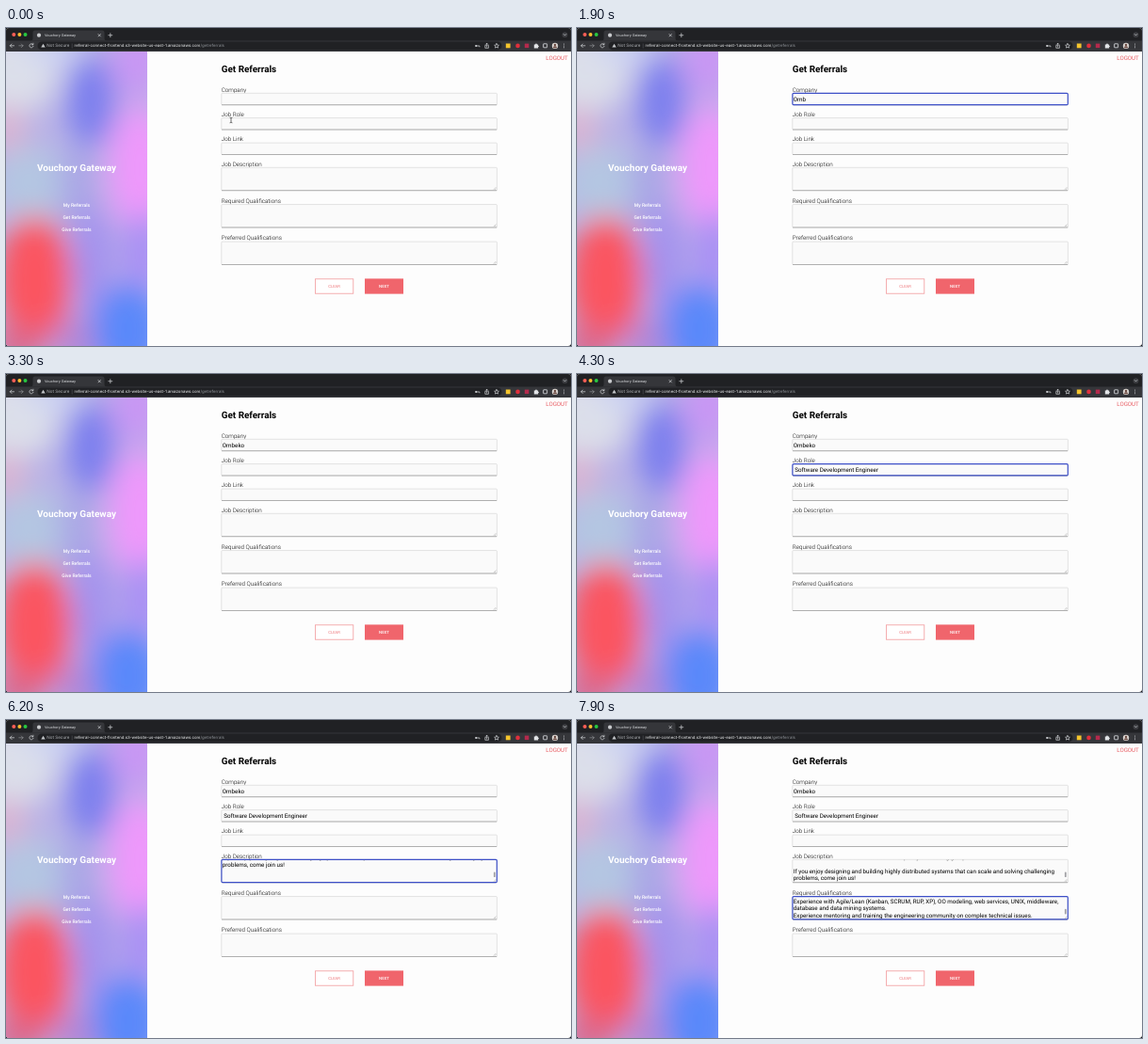
Animation of 600 by 338 pixels, one loop 8 s. Source, as an HTML page:

```html
<!DOCTYPE html>
<html lang="en">
<head>
<meta charset="utf-8">
<title>Get Referrals</title>
<style>
  html, body { margin: 0; width: 100%; height: 100%; overflow: hidden; background: #000; }
  svg { display: block; width: 100vw; height: 100vh; }
  text { font-family: Roboto, Arial, sans-serif; text-rendering: geometricPrecision; white-space: pre; }
  .chrome text { font-family: Inter, Roboto, sans-serif; }
  .icon { fill: none; stroke: #d5d7da; stroke-width: .7; stroke-linecap: round; stroke-linejoin: round; }
</style>
</head>
<body>
<svg id="stage" viewBox="0 0 600 338" preserveAspectRatio="none">
  <defs>
    <filter id="soft" x="-60%" y="-60%" width="220%" height="220%"><feGaussianBlur stdDeviation="15"/></filter>
    <clipPath id="window"><rect width="600" height="338" rx="3"/></clipPath>
    <clipPath id="side"><rect y="25" width="150" height="313"/></clipPath>
  </defs>
  <g clip-path="url(#window)">
    <rect width="600" height="338" fill="#fdfdfd"/>
    <g id="sidebar" clip-path="url(#side)"></g>
    <g id="chrome" class="chrome"></g>
    <g id="page"></g>
    <g id="fields"></g>
    <g id="pointer" fill="none" stroke="#333" stroke-width=".7">
      <path d="M-1.4-2.8Q0-2.8 0-1.8Q0-2.8 1.4-2.8M0-1.8V1.8M-1.4 2.8Q0 2.8 0 1.8Q0 2.8 1.4 2.8"/>
    </g>
  </g>
</svg>
<script>
const LOOP = 8000;
const APP = 'Vouchory Gateway';
const COMPANY = 'Ombeko';
const SVG_NS = 'http://www.w3.org/2000/svg';
const byId = id => document.getElementById(id);

function add(parent, tag, attrs, content) {
  const node = document.createElementNS(SVG_NS, tag);
  for (const key in attrs) node.setAttribute(key, attrs[key]);
  if (content !== undefined) node.textContent = content;
  return parent.appendChild(node);
}
const label = (parent, x, y, size, content, attrs = {}) =>
  add(parent, 'text', { x, y, 'font-size': size, ...attrs }, content);
const show = (node, on) => node.setAttribute('visibility', on ? 'visible' : 'hidden');

function drawSidebar() {
  const side = byId('sidebar');
  add(side, 'rect', { y: 25, width: 150, height: 313, fill: '#b9b2e6' });
  const blur = add(side, 'g', { filter: 'url(#soft)' });
  // cx, cy, rx, ry, colour
  [
    [10, 45, 48, 45, '#dcdfea'],
    [52, 20, 30, 20, '#ccd3f3'],
    [140, 35, 28, 40, '#c996f4'],
    [90, 78, 26, 48, '#7c7fee'],
    [2, 108, 18, 26, '#dfb4cf'],
    [142, 150, 34, 68, '#ee98fb'],
    [25, 165, 40, 40, '#b4c6e2'],
    [76, 170, 18, 50, '#a9a4e6'],
    [92, 248, 22, 60, '#a391ee'],
    [145, 240, 20, 44, '#a88df6'],
    [30, 268, 40, 68, '#fb5560'],
    [12, 338, 30, 22, '#d9698f'],
    [75, 335, 24, 30, '#b487d6'],
    [130, 322, 38, 50, '#5a88fa']
  ].forEach(([cx, cy, rx, ry, fill]) => add(blur, 'ellipse', { cx, cy, rx, ry, fill }));

  const centred = { 'text-anchor': 'middle', fill: '#fff' };
  label(side, 75, 151.5, 10, APP, { ...centred, 'font-weight': 700 });
  ['My Referrals', 'Get Referrals', 'Give Referrals'].forEach((item, i) =>
    label(side, 75, 189.7 + i * 13, 5, item, { ...centred, 'font-weight': 500 }));
}

function drawChrome() {
  const bar = byId('chrome');
  const icon = d => add(bar, 'path', { d, class: 'icon' });
  const dot = (cx, cy, r, fill) => add(bar, 'circle', { cx, cy, r, fill });

  add(bar, 'rect', { width: 600, height: 25, fill: '#202124' });
  add(bar, 'rect', { y: 13.5, width: 600, height: 11.5, fill: '#35363a' });
  add(bar, 'path', { d: 'M26 13.5Q28.5 13.5 28.5 11V5Q28.5 2.5 31 2.5H102Q104.5 2.5 104.5 5V11Q104.5 13.5 107 13.5Z', fill: '#35363a' });
  ['#fe5f57', '#febc2e', '#28c840'].forEach((fill, i) => dot(8.3 + i * 6.1, 7, 2, fill));
  dot(35, 7.7, 2.1, '#c9cbce');
  label(bar, 41, 9.3, 3.7, APP, { fill: '#e8eaed' });
  icon('M98 6.5l2.4 2.4M100.4 6.5l-2.4 2.4M108.8 7.7h4M110.8 5.7v4');
  dot(593.5, 7.2, 2.9, '#3c3d41');
  icon('M592.2 6.6l1.3 1.3l1.3-1.3');

  icon('M8.6 18.8H4.3M6.1 17l-1.8 1.8l1.8 1.8');
  icon('M13.8 18.8H18M16.3 17l1.8 1.8l-1.8 1.8').setAttribute('opacity', .55);
  icon('M28.8 17.7A2.1 2.1 0 1 0 29 19.4M28.9 16.2v1.6h-1.6');

  add(bar, 'rect', { x: 33.5, y: 14.4, width: 493, height: 9, rx: 4.5, fill: '#202124' });
  add(bar, 'path', { d: 'M39.5 16.7l2.2 3.9h-4.4Z', fill: '#c4c7ca' });
  label(bar, 43.3, 20.4, 4.55, 'Not Secure', { fill: '#b5b8bc' });
  add(bar, 'path', { d: 'M70.2 16.5v5', stroke: '#5f6368', 'stroke-width': .5 });
  const url = label(bar, 72.6, 20.4, 4.33, '');
  add(url, 'tspan', { fill: '#f1f3f4' }, 'referral-connect-frontend.s3-website-us-east-1.amazonaws.com');
  add(url, 'tspan', { fill: '#8f9398' }, '/getreferrals');

  dot(499.2, 19, 1.1, '#d5d7da');
  icon('M500.4 19h2.5v.9');
  icon('M509.4 18.4h-.6v2.9h3.6v-2.9h-.6M510.6 20v-3.6M509.5 17.3l1.1-1.1l1.1 1.1');
  icon('M521 16.6l.7 1.5l1.7.2l-1.2 1.1l.3 1.7l-1.5-.8l-1.5.8l.3-1.7l-1.2-1.1l1.7-.2Z');
  add(bar, 'rect', { x: 530.8, y: 16.5, width: 4.8, height: 4.8, fill: '#f6c52c' });
  dot(543.5, 18.9, 2.3, '#e02f3c');
  add(bar, 'rect', { x: 550.8, y: 16.6, width: 4.5, height: 4.5, fill: '#b42a4c' });
  add(bar, 'path', { d: 'M560.8 17.4h1.3a.9.9 0 0 1 1.8 0h1.2v1.3a.8.8 0 0 1 0 1.6v1.2h-4.3Z', fill: '#e1e3e6' });
  add(bar, 'rect', { x: 570.6, y: 16.8, width: 4, height: 4, rx: .4, fill: 'none', stroke: '#e1e3e6', 'stroke-width': .8 });
  dot(583, 18.9, 3.2, '#d8d2ce');
  dot(583, 18, 1.2, '#6a4a42');
  add(bar, 'path', { d: 'M580.9 21.3a2.1 2.1 0 0 1 4.2 0Z', fill: '#6a4a42' });
  [17.1, 18.9, 20.7].forEach(y => dot(592.5, y, .5, '#d5d7da'));
}

function drawPage() {
  const page = byId('page');
  label(page, 228.8, 46.9, 9.9, 'Get Referrals', { 'font-weight': 700, fill: '#000' });
  label(page, 596.7, 33.7, 6.15, 'LOGOUT', { 'text-anchor': 'end', fill: '#e85d63' });
  add(page, 'rect', { x: 328.4, y: 266.8, width: 40.4, height: 15.4, fill: '#fff', stroke: '#f29a9d', 'stroke-width': .8 });
  add(page, 'rect', { x: 381, y: 266.4, width: 41, height: 16.2, fill: '#f0656c' });
  label(page, 348.6, 276, 4.2, 'CLEAR', { 'text-anchor': 'middle', fill: '#ee767b' });
  label(page, 401.5, 276, 4.3, 'NEXT', { 'text-anchor': 'middle', fill: '#fff', 'font-weight': 500 });
}

function makeField(name, top, height) {
  const root = add(byId('fields'), 'g', {});
  const area = height > 20;
  label(root, 228.8, top - 1.5, 6.25, name, { 'font-weight': 300, fill: '#000' });
  add(root, 'rect', { x: 228.8, y: top + .3, width: 292.6, height: height - .6, rx: .8, fill: '#fafafa', stroke: '#d0d0d0', 'stroke-width': .6 });
  add(root, 'path', { d: `M229 ${top + height - .3}H521.2`, stroke: '#a3a3a3', 'stroke-width': .8 });

  const clipId = 'clip' + top;
  const clip = add(root, 'clipPath', { id: clipId });
  add(clip, 'rect', { x: 229, y: top + .7, width: 292, height: height - 1.4 });
  const content = add(root, 'g', { 'clip-path': `url(#${clipId})` });
  const text = add(content, 'g', {});
  const thumb = add(root, 'rect', { x: 517.9, y: top + 13.5, width: 1.8, height: 5.6, rx: .9, fill: '#a2a2a6', visibility: 'hidden' });
  if (area) {
    const corner = top + height - 1.2;
    add(root, 'path', { d: `M517.8 ${corner}l2.6-2.6M519.2 ${corner}l1.2-1.2`, stroke: '#888', 'stroke-width': .4 });
  }
  const ring = add(root, 'rect', { x: 228.9, y: top + .4, width: 292.4, height: height - .8, rx: 1.2, fill: 'none', stroke: '#3e50c8', 'stroke-width': 1.2 });
  return { text, ring, thumb };
}

const LINE = 7.5;
const writeLines = (field, x, y, lines) => lines.map((line, i) =>
  label(field.text, x, y + i * LINE, 6.25, line, { fill: '#000' }));

drawSidebar();
drawChrome();
drawPage();

const company = makeField('Company', 69, 13);
const role = makeField('Job Role', 95.3, 13);
const link = makeField('Job Link', 121.8, 13);
const description = makeField('Job Description', 148, 25);
const required = makeField('Required Qualifications', 187.3, 25);
const preferred = makeField('Preferred Qualifications', 226.8, 25);

const [companyText] = writeLines(company, 229.8, 77.8, ['']);
writeLines(role, 231.2, 104, ['Software Development Engineer']);
writeLines(description, 229.8, 147.6, [
  'The ideal candidate has an interest in the quality of a strong group.',
  '',
  'If you enjoy designing and building highly distributed systems that can scale and solving challenging',
  'problems, come join us!'
]);
writeLines(required, 229.8, 194.8, [
  'Experience with Agile/Lean (Kanban, SCRUM, RUP, XP), OO modeling, web services, UNIX, middleware,',
  'database and data mining systems.',
  'Experience mentoring and training the engineering community on complex technical issues.'
]);

const KEY_TIMES = [1500, 1700, 1850, 2050, 2200, 2400];
// [field, focus, blur, filled]
const VISITS = [
  [company, 750, 2800, 0],
  [role, 3800, 4700, 4100],
  [link, LOOP, LOOP, LOOP],
  [description, 5400, 6800, 5800],
  [required, 7100, LOOP, 7500],
  [preferred, LOOP, LOOP, LOOP]
];
const AREAS = [description, required];

function render(t) {
  for (const [field, focus, blur, filled] of VISITS) {
    show(field.ring, t >= focus && t < blur);
    show(field.text, t >= filled);
    if (AREAS.includes(field)) show(field.thumb, t >= filled);
  }
  companyText.textContent = COMPANY.slice(0, KEY_TIMES.filter(k => t >= k).length);
  description.text.setAttribute('transform', `translate(0 ${t < 6500 ? -14.4 : 0})`);

  const p = Math.min(1, Math.max(0, (t - 250) / 450));
  const ease = p * p * (3 - 2 * p);
  byId('pointer').setAttribute('transform', `translate(${239 + 6 * ease} ${98 - 22 * ease})`);
  show(byId('pointer'), t < 850);
}

const start = performance.now();
function tick() {
  render((performance.now() - start) % LOOP);
  requestAnimationFrame(tick);
}
tick();
</script>
</body>
</html>
```
